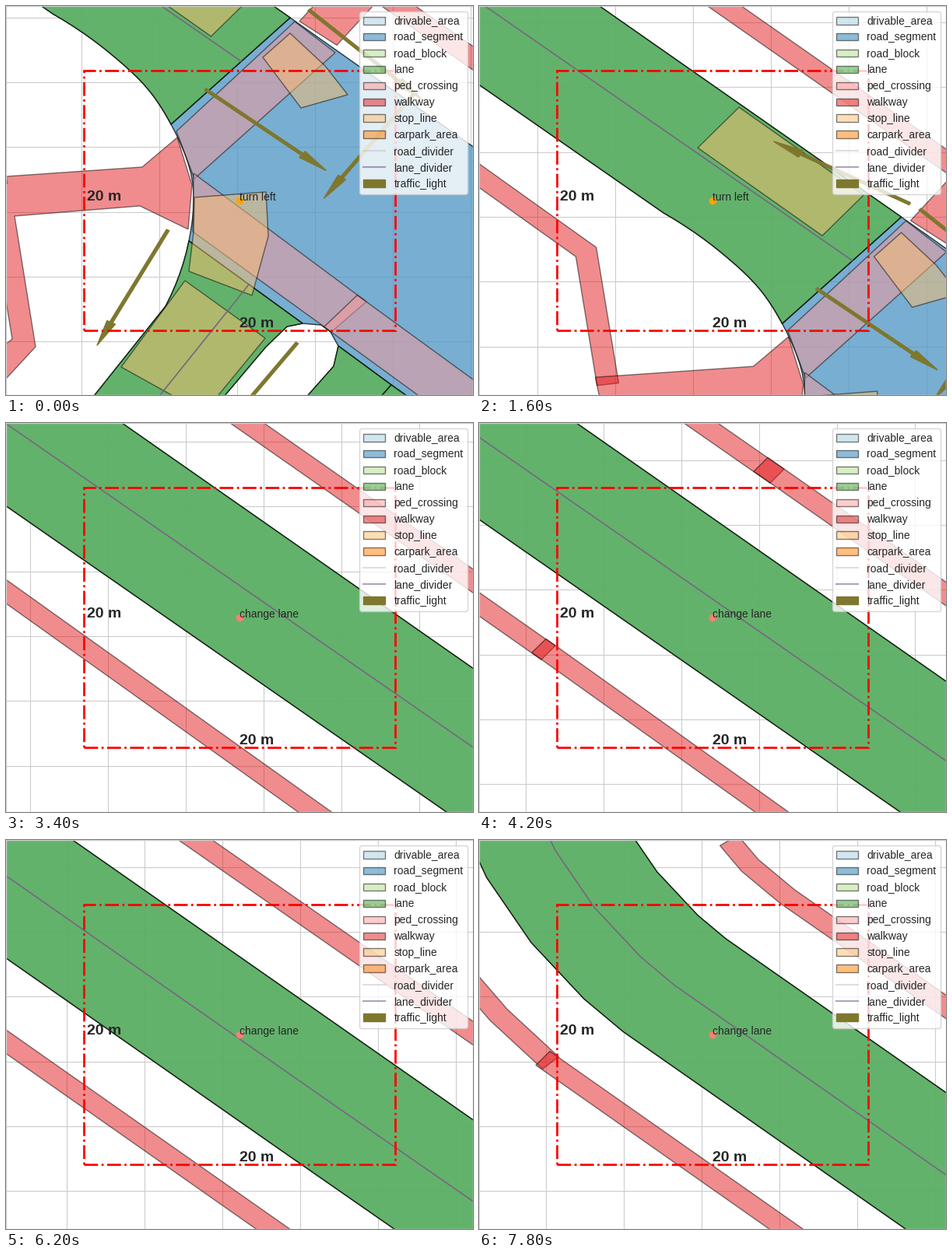
Recreate the animation shown at these times as a matplotlib script. Size 600 by 500 pixels, loop 8 s.

```python
import numpy as np
import matplotlib.pyplot as plt
from matplotlib.animation import FuncAnimation
from matplotlib.lines import Line2D
from matplotlib.patches import Arrow, Patch, Polygon, Rectangle
from matplotlib.transforms import Affine2D

plt.rcParams.update({"font.family": "Liberation Sans", "font.size": 10,
                     "text.color": ".15"})

FRAMES, STEP_MS = 40, 200
HALF = 15  # metres visible on each side of the vehicle

COLORS = {
    "drivable_area": "#a6cee3", "road_segment": "#1f78b4",
    "road_block": "#b2df8a", "lane": "#33a02c",
    "ped_crossing": "#fb9a99", "walkway": "#e31a1c",
    "stop_line": "#fdbf6f", "carpark_area": "#ff7f00",
    "road_divider": "#c4bcc8", "lane_divider": "#5f4a72",
    "traffic_light": "#7e772e",
}


def metres(*points):
    """Survey units (20 per metre east, 16.67 per metre south) to metres."""
    return (np.array(points, float) - (297, 264.7)) * (0.05, -0.06)


def spline(knots, points, t):
    """Smooth curve that passes points[i] at knots[i]."""
    slope = np.gradient(points, knots, axis=0, edge_order=2)
    i = np.clip(np.searchsorted(knots, t, side="right") - 1, 0, len(knots) - 2)
    span = (knots[i + 1] - knots[i])[:, None]
    u = (t - knots[i])[:, None] / span
    rise = u * u * (3 - 2 * u)
    return (points[i] * (1 - rise) + points[i + 1] * rise
            + span * u * (1 - u) * ((1 - u) * slope[i] - u * slope[i + 1]))


def sides(line, width):
    """Left and right edges of a band around a polyline, with mitred bends."""
    step = np.diff(line, axis=0)
    step /= np.linalg.norm(step, axis=1, keepdims=True)
    normal = np.column_stack([-step[:, 1], step[:, 0]])
    before = np.vstack([normal[:1], normal])
    after = np.vstack([normal, normal[-1:]])
    mitre = (before + after) / (1 + (before * after).sum(1, keepdims=True))
    return line + mitre * width / 2, line - mitre * width / 2


fig = plt.figure(figsize=(6, 5), dpi=100)
ax = fig.add_axes([0, 0, 1, 1])
ticks = np.arange(-100, 105, 5)
ax.set_xticks(ticks)
ax.set_yticks(ticks)
ax.tick_params(length=0, labelbottom=False, labelleft=False)
ax.set_axisbelow(True)
ax.grid(color=".8", lw=0.8)
for spine in ax.spines.values():
    spine.set(color=".8", lw=1)


def area(layer, points):
    ax.add_patch(Polygon(points, fc=COLORS[layer], ec="black", lw=1,
                         alpha=0.5))


def band(layer, width, *points):
    left, right = sides(metres(*points), width)
    area(layer, np.vstack([left, right[::-1]]))


def divider(line):
    ax.plot(*line.T, color="#76687e", lw=1.2)


def light(x, y, heading, length=10):
    start = metres((x, y))[0]
    angle = np.radians(heading)
    ax.add_patch(Arrow(*start, length * np.cos(angle), length * np.sin(angle),
                       width=1, zorder=2.2, color=COLORS["traffic_light"]))


# Roads: a two-lane road from the west, a side road leaving to the south
centre = metres((-1415, -1225), (-1391, -1173), (-1341, -1100), (-1281, -1036),
                (-1238, -1000), (-663, -598), (302, 71))
north, south = sides(centre, 9.72)

SUB = 6
kerb_keys = metres((60, 10), (134, 61), (185, 110), (212, 152), (240, 228),
                   (235, 302), (205, 386))
gaps = np.linalg.norm(np.diff(kerb_keys, axis=0), axis=1)
knots = np.append(0, gaps.cumsum())
index = np.arange(len(knots))
kerb = spline(knots, kerb_keys,
              np.interp(np.arange(index[-1] * SUB + 1) / SUB, index, knots))
west_end, side_start = 3 * SUB, 5 * SUB

corner = metres((365, 15))
island = metres((427, 437), (417, 419), (405, 410), (381, 408))
lanes = [
    np.vstack([north[:-1], corner, kerb[west_end::-1], south[-2::-1]]),
    np.vstack([kerb[side_start:], metres((102, 515), (269, 515), (334, 438),
                                         (361, 412)), island[-1:]]),
    metres((427, 437), (495, 487), (470, 515), (375, 515), (421, 463)),
    metres((495, 487), (535, 515), (470, 515)),
]
junction = np.vstack([corner, metres((640, 209), (640, 595), (495, 487)),
                      island, kerb[side_start:west_end - 1:-1]])

for layer in ("drivable_area", "road_segment"):
    for shape in lanes + [junction]:
        area(layer, shape)
for layer in ("road_block", "lane"):
    for shape in lanes:
        area(layer, shape)
divider(centre)
divider(metres((312, 358), (186, 515)))

# Crossings
area("ped_crossing", metres((219, 161), (371, 20), (423, 60), (242, 222)))
area("ped_crossing", metres((241, 215), (463, 380), (418, 419), (240, 290)))
band("ped_crossing", 3.24, (430, 392), (640, 545))

# Walkways
PATH = 1.4
band("walkway", PATH, (-1168, -1186), (-1141, -1154), (-1093, -1114),
     (-280, -548))
band("walkway", PATH, (-301, -563), (640, 95))
band("walkway", 3.03, (401, 35), (448, -16))
band("walkway", PATH, (-1520, -1027), (-1464, -962), (-1397, -900))
band("walkway", PATH, (-1407, -906), (-574, -321))
band("walkway", PATH, (-586, -330), (-40, 60), (-12, 230))
area("walkway", metres((-28, 221), (175, 207), (220, 169), (239, 230),
                       (234, 287), (172, 257), (11, 270), (38, 438),
                       (-10, 490), (-40, 466), (8, 428), (-17, 275)))

# Stop lines
area("stop_line", metres((365, 35), (330, 66), (379, 131), (439, 114),
                         (410, 77)))
area("stop_line", metres((242, 246), (334, 239), (337, 296), (316, 372),
                         (235, 341), (241, 290)))
area("stop_line", metres((230, 353), (333, 427), (254, 523), (148, 464)))
band("stop_line", 4.1, (130, -100), (290, 13))

light(256, 107, -38.9)
light(525, 112, 234.3)
light(208, 288, 242.9)
light(374, 433, 234.7)
light(389, 5, -43.5)
light(376, -2, 151.2)

# Overlay fixed to the vehicle, in metres around it
hud = Affine2D().translate(HALF, HALF).scale(0.5 / HALF) + ax.transAxes
ax.add_patch(Rectangle((-10, -10), 20, 20, fill=False, ec="red", lw=2, ls="-.",
                       transform=hud, zorder=3))
for x, y in [(-9.8, 0), (0, -9.8)]:
    ax.text(x, y, "20 m", fontsize=14, weight="bold", transform=hud, zorder=4)
dot, = ax.plot([0], [0], "o", ms=6, transform=hud, zorder=3.5)
label = ax.text(0, 0, "", transform=hud, zorder=4)

handles = []
for name, color in COLORS.items():
    if name.endswith("divider"):
        handles.append(Line2D([], [], color=color, alpha=0.5, label=name))
    elif name == "traffic_light":
        handles.append(Patch(color=color, label=name))
    else:
        handles.append(Patch(fc=color, ec="black", alpha=0.5, label=name))
ax.legend(handles=handles, loc="upper right", framealpha=0.8)

# Vehicle path through timed waypoints
times = np.array([0, 4, 13, 21, 27, 35, 39], float)
waypoints = metres((300, 250), (263, 119.4), (-104, -154.3), (-363, -366.3),
                   (-595, -555), (-983, -816), (-1189, -936.5))
route = spline(times, waypoints, np.arange(FRAMES))

ACTIONS = [(0, "turn left", "orange"), (10, "decelerate", "yellow"),
           (16, "change lane", "salmon")]


def draw(k):
    x, y = route[k]
    ax.set_xlim(x - HALF, x + HALF)
    ax.set_ylim(y - HALF, y + HALF)
    _, text, color = [a for a in ACTIONS if a[0] <= k][-1]
    label.set_text(text)
    dot.set_color(color)
    return []


anim = FuncAnimation(fig, draw, frames=FRAMES, interval=STEP_MS, repeat=True,
                     repeat_delay=0, blit=False)
plt.show()
```
